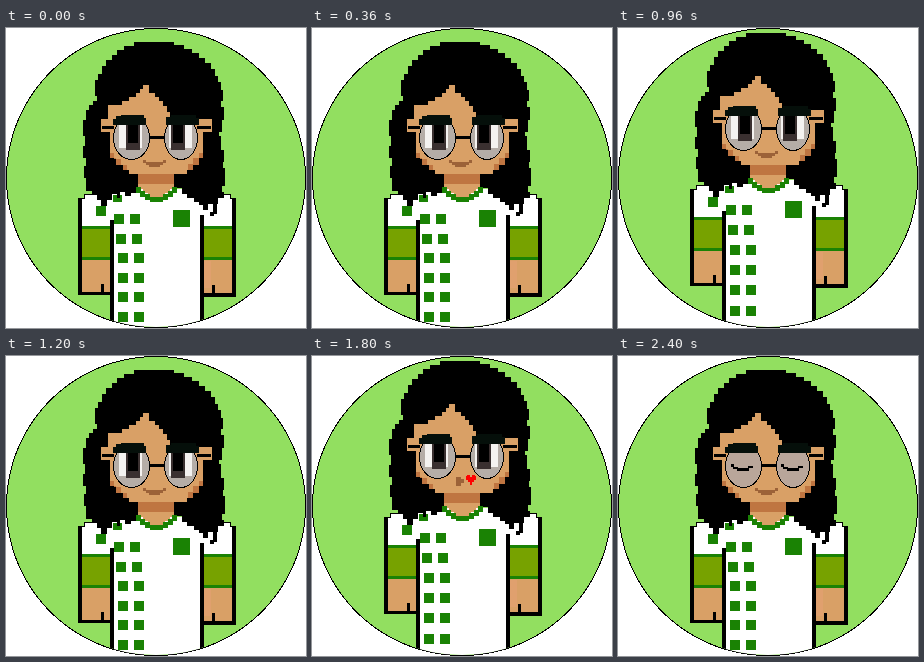
An HTML page with a canvas for the animation above (2.6 s loop, 300 px wide and 300 px high).

```html
<!DOCTYPE html>
<html lang="en">
<head>
<meta charset="utf-8">
<style>
html, body { margin: 0; width: 100%; height: 100%; overflow: hidden; background: #fff; }
canvas { display: block; }
</style>
</head>
<body>
<canvas id="stage" width="300" height="300"></canvas>
<script>
const ctx = document.getElementById('stage').getContext('2d');
const SKIN = '#d9a066', SHADE = '#bf7541', LIP = '#9c6238';
const BLACK = '#000', WHITE = '#fff', BROW = '#050f0a';
const GREEN = '#1a8204', OLIVE = '#77a200';

const hair = 'M128 14H168V17H178V21H186V25H193V30H199V35H205V41H209V48H212V54H215V62H217V73H215V79H218V92H216' +
  'V104H213V108H215V122H218V134H217V140H219V158H216V164H218V170H212V176H211V186H208V188H204V184H207V176' +
  'H202V182H197V177H193V174H188V170H181V166H176V160H168V146H132V160H130V165H125V168H119V164H114' +
  'V170H111V166H106V172H101V178H95V172H91V167H86V163H80V150H78V138H80V130H77V118H79V108' +
  'H77V92H80V82H83V77H87V73H91V68H89V52H92V46H96V38H100V32H106V27H111V22H118V18H128Z';
const face = 'M137 57H143V65H149V69H153V73H157V78H161V84H164V91H206V104H197V130H193V137' +
  'H187V142H181V146H123V142H117V137H110V130H104V104H95V91H102V77H116V73H123V69H130V65H134V61H137Z';
const collar = 'M130 159H135V163H139V166H144V169H157V166H162V163H166V159H171V165' +
  'H167V169H162V172H157V174H144V172H139V169H134V165H130Z';

function rect(color, x, y, w, h) {
  ctx.fillStyle = color;
  ctx.fillRect(x, y, w, h);
}

function shape(color, path) {
  ctx.fillStyle = color;
  ctx.fill(new Path2D(path));
}

// Ellipse made of whole-pixel rows, without soft edges
function disc(color, cx, cy, rx, ry) {
  for (let y = Math.round(cy - ry); y < cy + ry; y++) {
    const v = (y + 0.5 - cy) / ry;
    const half = rx * Math.sqrt(Math.max(0, 1 - v * v));
    const left = Math.round(cx - half);
    rect(color, left, y, Math.round(cx + half) - left, 1);
  }
}

function ringed(color, cx, cy, rx, ry) {
  disc(BLACK, cx, cy, rx, ry);
  disc(color, cx, cy, rx - 1, ry - 1);
}

function band(x, w) {
  rect(OLIVE, x, 198, w, 34);
  rect(GREEN, x, 198, w, 3);
  rect(GREEN, x, 229, w, 3);
}

function drawBody(raised) {
  // sleeves and arms
  shape(BLACK, 'M78 166H107V267H72V170H78Z');
  shape(BLACK, 'M196 166H225V170H230V269H196Z');
  rect(SKIN, 76, 232, 28, 32);
  rect(SKIN, 198, 232, 28, 33);
  rect('#e0a06e', 198, 233, 7, 27);
  rect(BLACK, 95, 256, 3, 8);
  rect(BLACK, 206, 257, 3, 9);
  shape(WHITE, 'M79 167H108V198H76V171H79Z');
  shape(WHITE, 'M194 167H224V171H226V198H194Z');
  band(76, 28);
  band(198, 28);
  // torso
  rect(WHITE, 104, 161, 94, 31);
  rect(BLACK, 104, 192, 4, 120);
  rect(BLACK, 194, 187, 4, 125);
  rect(WHITE, 108, 187, 86, 125);
  // printed squares
  rect(GREEN, 90, 178, 10, 10);
  rect(GREEN, 107, 167, 9, 7);
  for (let row = 0; row < 6; row++) {
    const x = 108 + 2 * Math.min(row, 2);
    const y = Math.round(186 + row * (raised ? 20.1 : 19.6));
    rect(GREEN, x, y, 10, 10);
    rect(GREEN, x + 16, y, 10, 10);
  }
  rect(GREEN, 167, 182, 17, 17);
}

function drawEye(x, pupil, closed) {
  if (closed) {
    rect(BLACK, x, 108, 3, 3);
    rect(BLACK, x + 2, 111, 5, 2);
    rect(BLACK, x + 6, 112, 12, 3);
    rect(BLACK, x + 17, 110, 5, 2);
    return;
  }
  rect('#f4f2f0', x, 97, 23, 23);
  rect('#3a3030', pupil, 97, 14, 25);
  rect(BLACK, pupil + 2, 97, 10, 18);
}

function drawHead(closed, kiss) {
  shape(BLACK, hair);
  shape(SKIN, 'M132 144H168V161H164V165H159V169H142V165H137V161H132Z');
  rect(SHADE, 132, 146, 36, 10);
  shape(SKIN, face);
  shape(SHADE, 'M104 125H108V131H115V137H121V142H117V137H110V130H104Z');
  shape(SHADE, 'M197 125H193V130H187V136H182V142H187V137H193V130H197Z');

  const lens = closed ? '#b9a69a' : '#b5ada7';
  ringed(lens, 125.5, 110, 18.5, 22);
  ringed(lens, 175, 110, 17, 22);
  drawEye(113, 120, closed);
  drawEye(163, 165, closed);
  shape(BROW, 'M107 91H110V88H115V87H138V90H140V97H107Z');
  shape(BROW, 'M160 89H165V87H190V90H193V97H160Z');
  rect(BLACK, 143, 108, 16, 3);
  rect(BLACK, 96, 98, 12, 3);
  rect(BLACK, 191, 98, 14, 3);

  if (kiss) {
    shape(LIP, 'M144 130H149V132H152V136H149V139H144Z');
    shape('#f00', 'M155 128H158V130H160V128H163V129H164V133H162V135H160V138H158V135H156V133H154V129H155Z');
  } else {
    shape(LIP, 'M137 132H140V134H157V132H160V135H157V137H154V139H143V137H140V135H137Z');
  }
}

function draw(now) {
  const t = now % 2600;
  const raised = t < 2400 && Math.floor(t / 600) % 2 === 1;
  rect(WHITE, 0, 0, 300, 300);
  ringed('#92df60', 150, 150, 150, 150);
  ctx.save();
  ctx.beginPath();
  ctx.arc(150, 150, 149, 0, 7);
  ctx.clip();
  ctx.translate(0, raised ? -9 : 0);
  drawBody(raised);
  drawHead(t >= 2400, raised && t >= 1800);
  shape(GREEN, collar);
  ctx.restore();
}

function tick() {
  draw(performance.now());
  requestAnimationFrame(tick);
}
tick();
</script>
</body>
</html>
```
